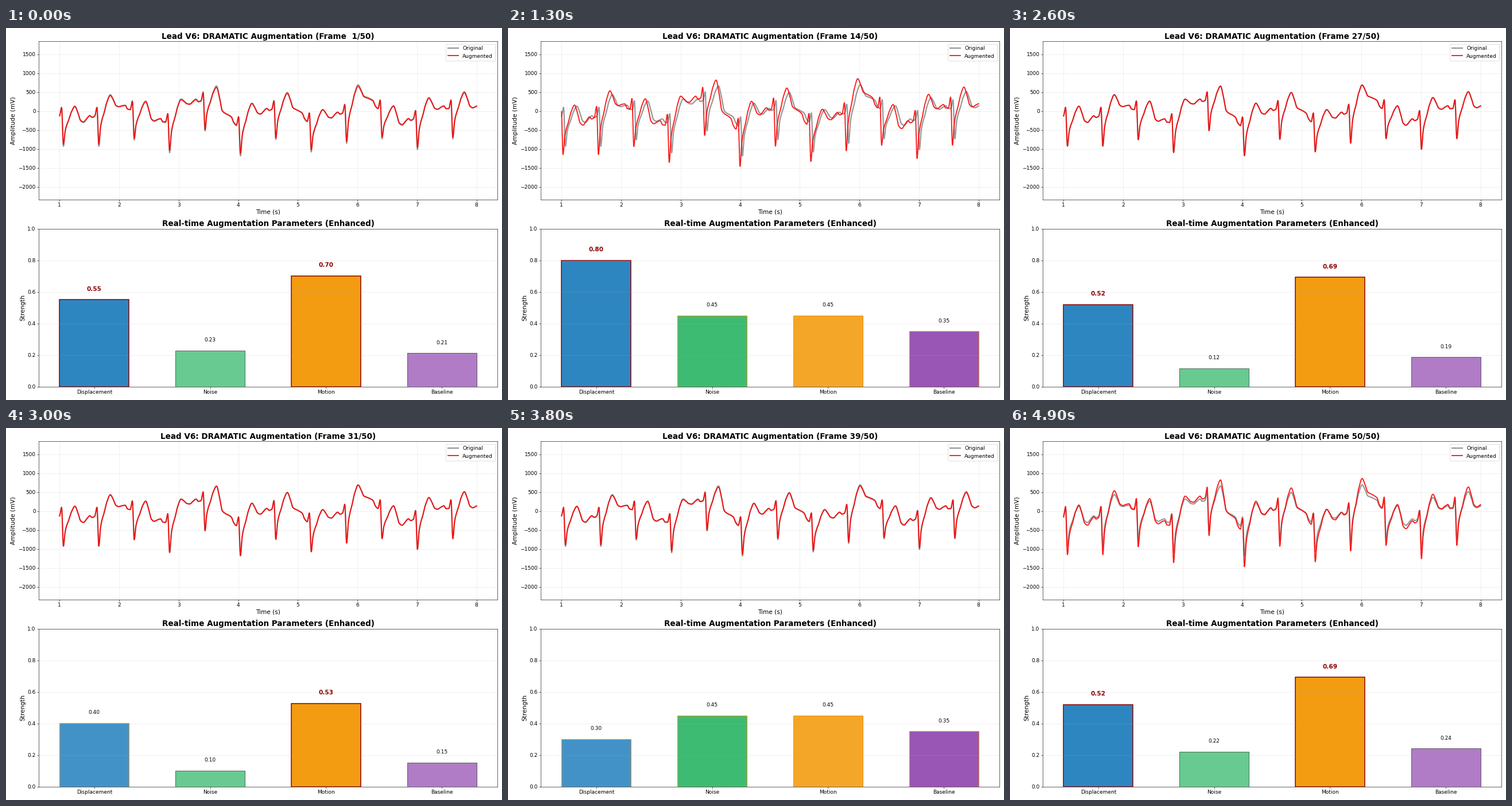
A matplotlib script for the animation above (5 s loop, 864 px wide and 648 px high).

```python
import numpy as np
import matplotlib.pyplot as plt
from matplotlib.animation import FuncAnimation

WIDTH, HEIGHT, DPI = 864, 648, 54
FRAMES = 50
BOOST = 0.45
NAMES = ["Displacement", "Noise", "Motion", "Baseline"]
COLORS = ["#2e86c1", "#28b463", "#f39c12", "#8e44ad"]

# Key levels of each heartbeat (mV): the trough, the wave after it, the rest.
BEAT, FIRST_TROUGH = 0.5943, 1.0646
TROUGHS = [-930, -930, -760, -1100, -520, -1185, -750, -1080, -850, -730, -1015, -730]
PEAKS = [130, 435, 265, 320, 665, 210, 495, 40, 695, 140, 360, 515]
RESTS = [-300, 120, -270, 190, -60, -80, 45, -185, 370, -375, 50, 90]


def beat_knots(trough, peak, rest, next_trough):
    """Yield (seconds from the trough, mV) for one heartbeat."""
    yield from [(-0.067, trough + 800), (-0.031, trough + 1030), (0, trough)]
    for dt, p in [(0.029, 0.36), (0.058, 0.53), (0.087, 0.64), (0.135, 0.86)]:
        yield dt, trough + p * (peak - trough)
    for dt, p in [(0.193, 0), (0.241, 0.38), (0.289, 0.9), (0.337, 1)]:
        yield dt, peak + p * (rest - peak)
    for dt, p, ripple in [(0.395, 0.3, 50), (0.443, 0.56, 80), (0.482, 0.77, 0)]:
        yield dt, rest + p * (next_trough + 800 - rest) + ripple


def smooth_curve(x, xk, yk):
    """Monotone cubic interpolation: extrema stay on the knots."""
    h = np.diff(xk)
    s = np.diff(yk) / h
    m = np.zeros_like(yk)
    a, b = s[:-1], s[1:]
    same = a * b > 0
    m[1:-1][same] = 2 * a[same] * b[same] / (a[same] + b[same])
    i = np.clip(np.searchsorted(xk, x) - 1, 0, len(h) - 1)
    u = (x - xk[i]) / h[i]
    return (yk[i] * (1 + 2 * u) * (1 - u) ** 2 + yk[i + 1] * u * u * (3 - 2 * u)
            + h[i] * u * (1 - u) * (m[i] * (1 - u) - m[i + 1] * u))


beats = zip(TROUGHS, PEAKS, RESTS, TROUGHS[1:] + TROUGHS[-1:])
KNOTS = np.array([(FIRST_TROUGH + k * BEAT + dt, mv)
                  for k, beat in enumerate(beats)
                  for dt, mv in beat_knots(*beat)]).T


def ecg(t):
    return smooth_curve(t, *KNOTS)


def strengths(i):
    a = 2 * np.pi * i / FRAMES
    v = np.array([0.55 + 0.25 * np.sin(a),
                  0.175 + 0.075 * np.sin(a + np.pi / 4),
                  0.45 + 0.25 * np.cos(2 * a),
                  0.275 + 0.125 * np.cos(2 * a + 2 * np.pi / 3)])
    # Too few strong effects: lift the two weakest.
    if np.sum(v > 0.4) < 2:
        v[np.argsort(v)[:2]] = BOOST
    return v


def gain(i):
    return np.interp(i, [0, 7, 19, 26, 33, 44, 49],
                     [0.945, 1.157, 1.31, 0.99, 0.99, 0.925, 1.24])


def bar_style(v):
    """Return alpha, edge colour and edge width."""
    if v > 0.5:
        return 1.0, "darkred", 2
    if v > 0.3:
        return 0.9, "darkorange", 1.5
    return 0.7, "black", 1


fig, (ax, bar_ax) = plt.subplots(2, 1, figsize=(WIDTH / DPI, HEIGHT / DPI), dpi=DPI)
fig.subplots_adjust(left=57 / WIDTH, right=856 / WIDTH, top=1 - 23 / HEIGHT,
                    bottom=1 - 625 / HEIGHT, hspace=51 / 275.5)
t = np.linspace(1, 8, 3500)

ax.plot(t, ecg(t), color="gray", lw=3, alpha=0.8, label="Original")
augmented, = ax.plot(t, ecg(t), color="red", lw=2.5, alpha=0.9, label="Augmented")
ax.set_xlim(0.65, 8.35)
ax.set_ylim(-2334, 1849)
ax.set_xlabel("Time (s)", fontsize=14)
ax.set_ylabel("Amplitude (mV)", fontsize=14)
title = ax.set_title("", fontsize=18, fontweight="bold")
ax.legend(loc="upper right", fontsize=12)
ax.grid(alpha=0.3)

bars = bar_ax.bar(NAMES, strengths(0), width=0.6, color=COLORS)
labels = [bar_ax.text(k, 0, "", ha="center", va="bottom") for k in range(len(NAMES))]
bar_ax.set_xlim(-0.48, 3.48)
bar_ax.set_ylim(0, 1)
bar_ax.set_ylabel("Strength", fontsize=14)
bar_ax.set_title("Real-time Augmentation Parameters (Enhanced)",
                 fontsize=18, fontweight="bold")
bar_ax.grid(axis="y", alpha=0.3)
for axes in (ax, bar_ax):
    axes.tick_params(labelsize=12)


def update(i):
    values = strengths(i)
    shift = 0.04 if values[0] > 0.6 else 0
    augmented.set_ydata(gain(i) * ecg(t + shift))
    title.set_text(f"Lead V6: DRAMATIC Augmentation (Frame {i + 1:2d}/{FRAMES})")
    for bar, label, v in zip(bars, labels, values):
        alpha, edge, width = bar_style(v)
        bar.set(height=v, alpha=alpha, edgecolor=edge, linewidth=width)
        strong = v > 0.5
        label.set(y=v + 0.05, text=f"{v:.2f}",
                  color="darkred" if strong else "black",
                  fontsize=14 if strong else 12,
                  fontweight="bold" if strong else "normal")
    return [augmented, title, *bars, *labels]


anim = FuncAnimation(fig, update, frames=FRAMES, interval=100, repeat=True)
plt.show()
```
